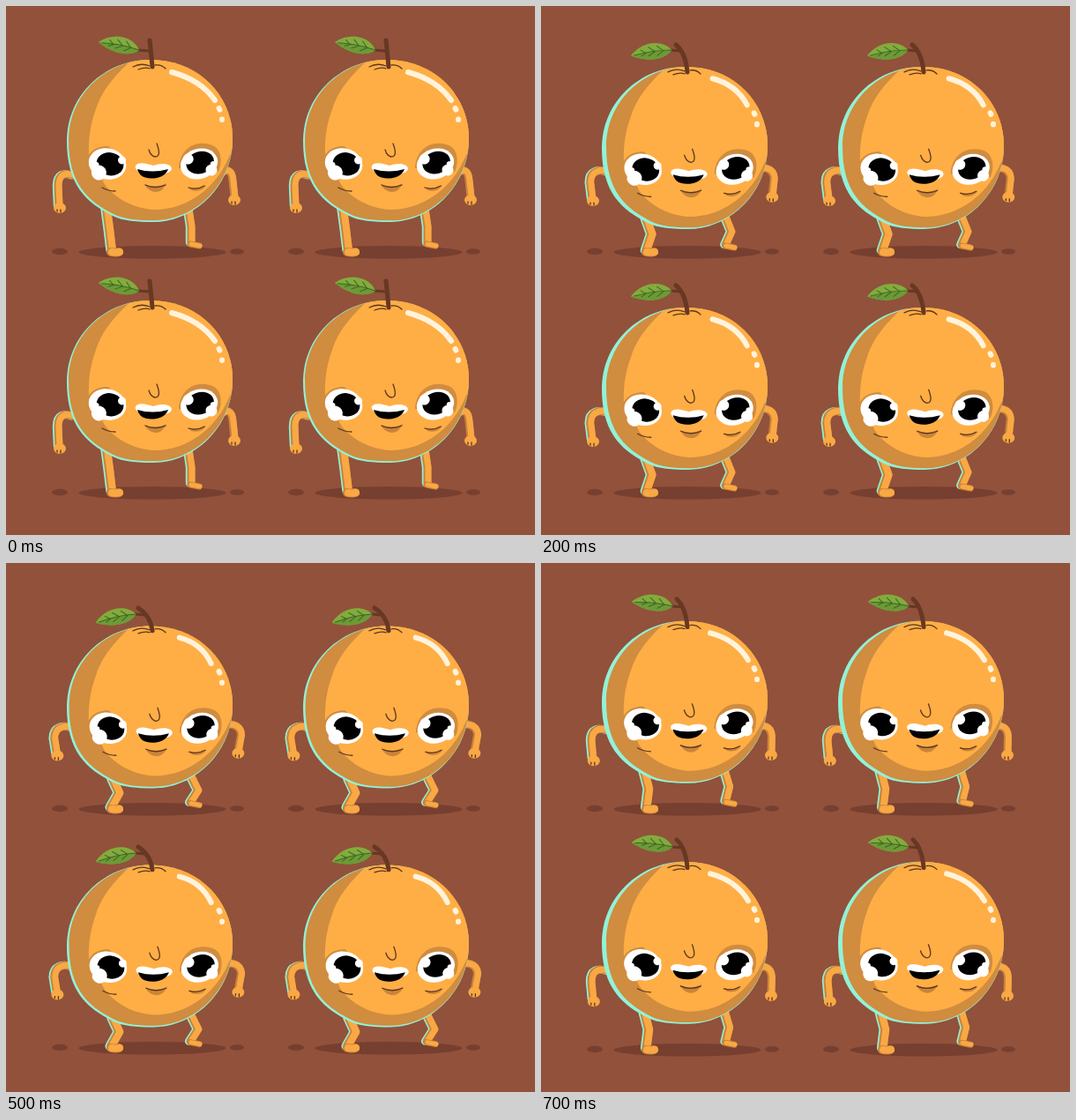
Write an HTML page that moves like this. It is 600 px wide and 600 px high and loops after 800 ms.

```html
<!DOCTYPE html>
<html lang="en">
<head>
<meta charset="utf-8">
<title>Bouncing oranges</title>
<style>
  html, body { margin: 0; width: 100%; height: 100%; overflow: hidden; background: #91513b; }
  svg { display: block; width: 100vw; height: 100vh; }
  .round { fill: none; stroke-linecap: round; stroke-linejoin: round; }
  .rim { stroke: #91f2d8; }
  .skin { stroke: #f9a844; }
  .dark { stroke: #c98338; }
  .line { stroke: #5d351f; stroke-width: 1.3; }
</style>
</head>
<body>
<svg viewBox="0 0 600 600">
  <defs>
    <path id="peel" d="M-94 0C-94-52-51-92 0-92C54-92 94-52 94-2C94 52 50 92 4 92
      C-14 92-30 91-42 85C-72 70-94 50-94 0Z"/>
    <clipPath id="bodyClip"><use class="body" href="#peel"/></clipPath>
    <g id="orange">
      <g fill="#773f2f">
        <ellipse cx="166" cy="279.300" rx="83.500" ry="7.300"/>
        <ellipse cx="61" cy="278.5" rx="9" ry="3.7"/>
        <ellipse cx="262" cy="278.5" rx="8" ry="3.3"/>
      </g>

      <g id="limbs"></g>

      <use id="rim" href="#peel" fill="#91f2d8"/>
      <use class="body" href="#peel" fill="#d08c3f"/>
      <g clip-path="url(#bodyClip)">
        <path id="light" fill="#ffae45" d="M-18-95C-32-80-52-64-61-36C-67-20-70-2-69 17
          C-66 30-56 36-52 48C-40 65-18 77 5 78C44 78 76 52 90 18L110-20V-110H-18Z"/>
      </g>

      <g id="shine" class="round" stroke="#fff3dc" stroke-width="6">
        <path id="arc"/>
        <path d="M241.600 116l.8 1.600M245 128.500v.6"/>
      </g>

      <g id="crown" class="round line">
        <path d="M144 69Q153 64 163 68M150 72Q158 69 163 71M169 67Q176 66 181 71"/>
      </g>
      <path id="twig" class="round" stroke="#673823" stroke-width="3"/>
      <path id="stem" class="round" stroke="#673823" stroke-width="5"/>
      <g id="leaf">
        <path fill="#83ab3d" d="M0 0C-8-13-31-16-47 0C-31 9-10 11 0 0Z"/>
        <path fill="#6c9a36" d="M0 0Q-20-2-47 0C-31 9-10 11 0 0Z"/>
        <path class="round" stroke="#3c6624" stroke-width="1"
          d="M0 0Q-20-3-43 0M-10-1l-6-6M-20-2l-6-5M-30-1l-5-4M-9-1l-8 5M-19-1l-8 4M-29-1l-6 3"/>
      </g>

      <g id="face">
        <path fill="#d08c3f" d="M196 184C197 164 212 152 231 157C245 160 246 177 241 188Z"/>
        <path fill="#d08c3f" d="M92 181C89 168 101 158 116 159L134 178Z"/>
        <g transform="translate(115 179) rotate(14)">
          <ellipse rx="21.500" ry="17.500" fill="#fff"/>
          <ellipse cx="3" cy="-.5" rx="15.500" ry="13"/>
          <g fill="#fff">
            <circle cx="-7" cy="12" r="8.500"/>
            <circle cx="15" cy="-8" r="4.500"/>
            <circle cx="-12" cy="4" r="3"/>
          </g>
        </g>
        <g transform="translate(219 179) rotate(-18)">
          <ellipse rx="21.500" ry="17" fill="#fff"/>
          <ellipse cx="1.500" cy="-1" rx="16" ry="12.500"/>
          <g fill="#fff">
            <circle cx="-10" cy="-9" r="6"/>
            <circle cx="11" cy="11" r="6.500"/>
            <circle cx="15" cy="5" r="3"/>
          </g>
        </g>
        <path class="round line" d="M171 156C174 164 175 171 169 171Q164 170 162 163"/>
        <path fill="#fff" d="M147 181C151 176 160 179 167 181C175 178 186 178 188 184C187 190 180 191 167 191C155 191 145 187 147 181Z"/>
        <path d="M149 185Q166 190 184 185C181 193 173 195.500 165 195.500C156 195.500 151 192 149 185Z"/>
        <path fill="#c98539" d="M157 202Q169 208 182 201Q178 211 169 211Q161 210 157 202ZM207 205Q216 209 227 203Q222 212 210 209Z"/>
        <path class="round line" d="M158 203Q169 208 181 203M109 206Q116 210 124 210M207 206Q216 209 225 204"/>
      </g>
    </g>
  </defs>
  <rect width="600" height="600" fill="#91513b"/>
  <g id="crowd"></g>
</svg>
<script>
const STEP = 100, STEPS = 8;
const SQUASH = [0, .4, .66, .87, 1];
const LEAF_Y = [50, 49, 50, 58, 60];
const LEAF_TILT = [11, 6, -8, -12, -14];
const STEM_X = [163, 154, 153, 150, 148];
const STEM_Y = [39, 41, 44, 51, 53];
const RIM = [2, 5, 5, 2.5, 2.5];

const el = id => document.getElementById(id);
const set = (node, attrs) => {
  for (const key in attrs) node.setAttribute(key, attrs[key]);
};
const shift = (id, x, y) => set(el(id), { transform: `translate(${x} ${y})` });

const crowd = el("crowd");
for (let i = 0; i < 4; i++) {
  const use = document.createElementNS("http://www.w3.org/2000/svg", "use");
  set(use, { href: "#orange", x: i % 2 * 268 });
  crowd.append(use);
}

function stroke(cls, d, width, dx = 0) {
  return `<path class="round ${cls}" d="${d}" stroke-width="${width}" transform="translate(${dx} 0)"/>`;
}

function limb(d, width, lit) {
  return (lit ? stroke("rim", d, width, -1.7) : "") +
    stroke("dark", d, width) + stroke("skin", d, width - 2, 1);
}

function hand(x, y) {
  return `<ellipse cx="${x}" cy="${y}" rx="7" ry="6" fill="#f9a844"/>` +
    stroke("line", `M${x - 3} ${y + 2}v2M${x + 1} ${y + 2}v3`, 1);
}

function drawLimbs(mix) {
  const lx = mix(60, 55), lTop = mix(190, 184), lhx = mix(61, 58), lhy = mix(229, 217);
  const rx = mix(256, 267), rTop = mix(187, 183), rhx = mix(259, 264), rhy = mix(220, 215);
  const armL = `M76 ${lTop + 2}C67 ${lTop - 1} ${lx - 1} ${lTop} ${lx - 1} ${lTop + 14}L${lhx - 1} ${lhy - 3}`;
  const armR = `M243 ${rTop + 3}C250 ${rTop - 3} ${rx} ${rTop - 2} ${rx + 1} ${rTop + 11}L${rhx} ${rhy - 3}`;
  const legL = `M${mix(114, 122)} ${mix(230, 247)}L${mix(117, 130)} ${mix(252, 262)}L${mix(120, 119)} 277`;
  const legR = `M${mix(207, 210)} ${mix(230, 243)}L${mix(210, 219)} ${mix(250, 259)}L${mix(210, 209)} ${mix(268, 272)}`;
  const footY = mix(271, 274);
  el("limbs").innerHTML =
    limb(armL, 9, true) + hand(lhx, lhy) +
    limb(armR, 9, false) + hand(rhx, rhy) +
    limb(legL, 10, true) + limb("M119 279Q123 280 128 279", 10, false) +
    limb(legR, 9, true) + limb(`M209 ${footY - 1}L219 ${footY + 1}`, 7, false);
}

function draw(time) {
  const n = Math.floor(time / STEP) % STEPS;
  const k = 4 - Math.abs(4 - n);
  const mix = (a, b) => +(a + (b - a) * SQUASH[k]).toFixed(2);
  const drop = mix(0, 12), rim = RIM[k];

  drawLimbs(mix);
  shift("rim", 163, 153 + drop);
  document.querySelectorAll(".body").forEach(node => set(node, {
    transform: `translate(${163 + rim / 2} ${152.2 + drop}) scale(${1 - rim / 188} .99)`
  }));
  shift("light", 163, 153 + drop);
  shift("face", mix(0, 1), mix(0, 9.5));
  shift("crown", 0, mix(0, 9));
  shift("shine", 0, mix(0, 8));
  set(el("arc"), { d: `M${mix(188, 198)} ${mix(75, 78)}Q${mix(221, 222)} 84 ${mix(237, 232)} 107` });

  const sx = STEM_X[k], sy = STEM_Y[k], base = mix(69, 78), leafX = mix(151, 147);
  set(el("stem"), { d: `M${sx} ${sy}Q164 ${sy + 9} 166 ${base}` });
  set(el("twig"), { d: `M${leafX - 1} ${LEAF_Y[k]}L${mix(163, 157)} ${LEAF_Y[k] + 1}` });
  set(el("leaf"), { transform: `translate(${leafX} ${LEAF_Y[k]}) rotate(${LEAF_TILT[k]})` });

  const rowY = k > 2 ? 271 : 273;
  [...crowd.children].forEach((use, i) => set(use, { y: i > 1 ? rowY : 0 }));
}

const start = performance.now();
function tick() {
  draw(performance.now() - start);
  requestAnimationFrame(tick);
}
tick();
</script>
</body>
</html>
```
